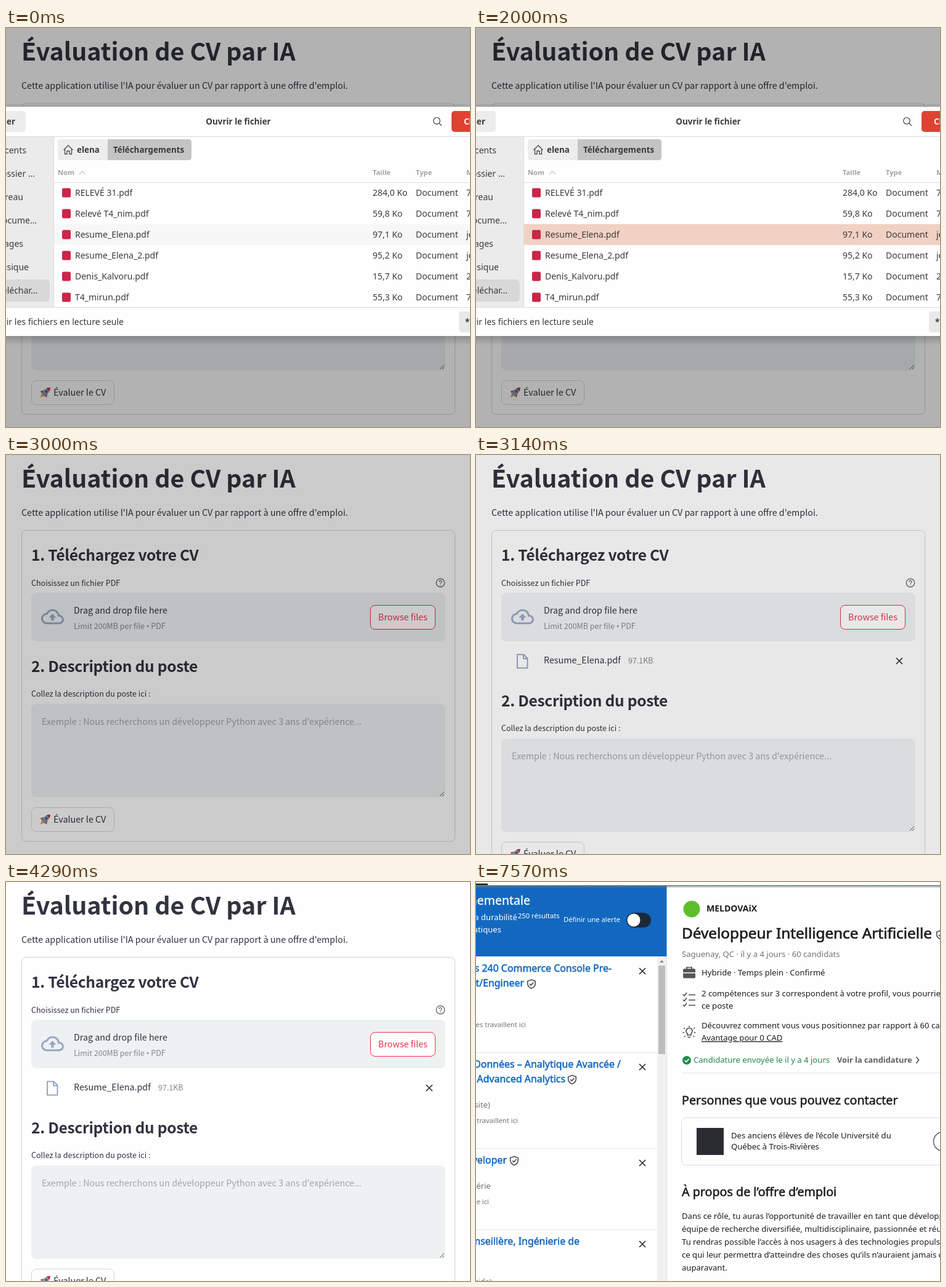
An HTML page for the animation above (8000 ms loop, 753x649 px).

```html
<!DOCTYPE html>
<html lang="fr">
<head>
<meta charset="utf-8">
<title>Évaluation de CV</title>
<style>
  html, body { margin: 0; width: 100%; height: 100%; overflow: hidden; background: #fefefe; }
  svg { display: block; }
  .scene, .anim { animation: 8s step-end infinite; }

  /* type */
  .app { font-family: "Noto Sans CJK JP", "Noto Sans CJK SC", "Noto Sans CJK", Lato, sans-serif; font-size: 14.3px; fill: #31333f; }
  .app .h1 { font-size: 39.4px; font-weight: 700; }
  .app .h2 { font-size: 24.6px; font-weight: 700; letter-spacing: -.3px; }
  .app .sm { font-size: 12.5px; }
  .app .mute { fill: #84858c; }
  .ui { font-family: "Noto Sans", "Open Sans", sans-serif; font-size: 14px; fill: #3b3b3b; }
  .ui .b { font-size: 13.4px; font-weight: 700; }
  .ui .col { font-size: 11.2px; font-weight: 700; fill: #a3a3a3; }
  .job { font-family: "Noto Sans", "Open Sans", sans-serif; font-size: 13.1px; fill: #1d1d1d; }
  /* a thin outline stands in for the medium weight */
  .job .title { font-size: 24.3px; stroke: #1d1d1d; stroke-width: .7; }
  .job .h { font-size: 19.7px; stroke: #1d1d1d; stroke-width: .55; }
  .job .link { font-size: 15.9px; fill: #0f66c0; stroke: #0f66c0; stroke-width: .5; }
  .job .tiny { font-size: 11.2px; }
  .job .grey { fill: #737373; }
  .job .white { fill: #fff; }
  .end { text-anchor: end; }

  /* lines */
  .line { fill: none; stroke: #dcdcdc; }
  .icon { fill: none; stroke: #4a4a4a; stroke-width: 1.6; }
  .thin { stroke-width: 1.3; }
  .cross { fill: none; stroke: #2b2d33; stroke-width: 1.7; }
  .frame { fill: none; stroke: #d3d4d8; }

  /* timeline */
  #page { animation-name: page; }
  #dialog { animation-name: dialog; }
  #offer { animation-name: offer; }
  #file { animation-name: file; }
  #lower { animation-name: lower; }
  #dim { animation-name: dim; fill: #000; }
  #row3 { animation-name: row3; }
  #row4 { animation-name: row4; }
  #choose { animation-name: choose; }
  #hover { animation-name: hover; }
  @keyframes page { 0% { visibility: visible } 78.625%, 100% { visibility: hidden } }
  @keyframes dialog { 0% { visibility: visible } 37.5%, 100% { visibility: hidden } }
  @keyframes offer { 0% { visibility: hidden } 78.625%, 100% { visibility: visible } }
  @keyframes file { 0% { opacity: 0 } 39.25%, 100% { opacity: 1 } }
  @keyframes lower { 0% { transform: translateY(-56px) } 39.25%, 100% { transform: none } }
  @keyframes dim { 0% { opacity: .3 } 37.5% { opacity: .2 } 39.25% { opacity: .088 } 41.125%, 100% { opacity: 0 } }
  @keyframes row3 {
    0% { fill: #f7f7f7 } 5.375% { fill: #fefefe } 8.875% { fill: #f4f4f4 } 19.625% { fill: #f1f1f1 }
    21.375% { fill: #f2e0d9 } 23.25%, 100% { fill: #f2d1c5 }
  }
  @keyframes row4 { 0% { fill: #fefefe } 5.375% { fill: #f5f5f5 } 8.875%, 100% { fill: #fefefe } }
  @keyframes choose { 0% { fill: #de4331 } 26.75% { fill: #de4b31 } 30.375%, 100% { fill: #df5431 } }
  @keyframes hover { 0% { opacity: 0 } 83.875% { opacity: 1 } 94.625%, 100% { opacity: 0 } }
</style>
</head>
<body>
<svg width="753" height="649" viewBox="0 0 753 649">
  <defs>
    <linearGradient id="shade" x2="0" y2="1">
      <stop offset="0" stop-color="#000" stop-opacity=".35"/>
      <stop offset="1" stop-color="#000" stop-opacity="0"/>
    </linearGradient>
    <linearGradient id="edge" x2="0" y2="1">
      <stop offset="0" stop-color="#6f7a7a"/>
      <stop offset="1" stop-color="#6f7a7a" stop-opacity="0"/>
    </linearGradient>
    <rect id="pdf" x="91" y="-7.5" width="14" height="15" rx="2.5" fill="#cb2547"/>
    <path id="x" d="M-5-5 5 5M5-5-5 5"/>
    <g id="shield" class="icon">
      <path d="M0-7 6.3-4.8V-1C6.3 3 3.6 5.6 0 7-3.6 5.6-6.3 3-6.3-1V-4.8Z"/>
      <path d="M-3-.2-.8 2 3.4-2.6"/>
    </g>
  </defs>

  <g id="page" class="scene app">
    <rect width="753" height="649" fill="#fefefe"/>
    <text class="h1" x="25" y="53">Évaluation de CV par IA</text>
    <text x="25" y="99">Cette application utilise l'IA pour évaluer un CV par rapport à une offre d'emploi.</text>
    <path class="frame" d="M25.5 480V130.5q0-8 8-8H720.5q8 0 8 8V480"/>
    <text class="h2" x="41" y="172">1. Téléchargez votre CV</text>
    <text class="sm" x="41" y="213">Choisissez un fichier PDF</text>
    <circle cx="705" cy="208" r="6.7" fill="none" stroke="#6c6d75" stroke-width="1.4"/>
    <path d="M703 206.6q0-2.2 2-2.2t2 1.9q0 1.2-1.2 1.9-.8.5-.8 1.6M705 211v1.3" fill="none" stroke="#6c6d75" stroke-width="1.3"/>
    <rect x="41" y="224" width="672" height="79" rx="8" fill="#eef1f2"/>
    <g transform="translate(57 244.5) scale(1.54)" fill="#98a6c3">
      <path d="M19.35 10.04A7.49 7.49 0 0 0 12 4C9.11 4 6.6 5.64 5.35 8.04A5.994 5.994 0 0 0 0 14c0 3.31 2.69 6 6 6h13c2.76 0 5-2.24 5-5 0-2.64-2.05-4.78-4.65-4.96zM19 18H6c-2.21 0-4-1.79-4-4 0-2.05 1.53-3.76 3.56-3.97l1.07-.11.5-.95A5.469 5.469 0 0 1 12 6c2.62 0 4.88 1.86 5.39 4.43l.3 1.5 1.53.11A2.98 2.98 0 0 1 22 15c0 1.65-1.35 3-3 3z"/>
      <path d="M8 13h2.55v3h2.9v-3H16l-4-4z"/>
    </g>
    <text x="110" y="258">Drag and drop file here</text>
    <text class="sm mute" x="110" y="283">Limit 200MB per file <tspan font-family="Noto Sans, sans-serif">•</tspan> PDF</text>
    <rect x="591.5" y="244.5" width="105" height="39" rx="7.5" fill="#fefefe" stroke="#e6344b"/>
    <text x="644" y="269" text-anchor="middle" fill="#e6344b">Browse files</text>

    <g id="file" class="anim">
      <path d="M67 324.5h10.5l6 6.2V346.5H67ZM77 324.5v6.7h6.5" fill="none" stroke="#98a6c3" stroke-width="2" stroke-linejoin="round"/>
      <text x="110" y="339">Resume_Elena.pdf</text>
      <text class="sm mute" x="247" y="339">97.1KB</text>
      <use href="#x" class="cross" x="687" y="335"/>
    </g>

    <g id="lower" class="anim">
      <path class="frame" d="M25.5 470V676.5q0 8 8 8H720.5q8 0 8-8V470"/>
      <text class="h2" x="41" y="409">2. Description du poste</text>
      <text class="sm" x="41" y="449">Collez la description du poste ici :</text>
      <rect x="41" y="461" width="672" height="152" rx="8" fill="#eef1f2"/>
      <text x="58" y="495" fill="#a3a4a9">Exemple : Nous recherchons un développeur Python avec 3 ans d'expérience...</text>
      <path d="M704 611l7-7M708 611l3-3" fill="none" stroke="#55565c"/>
      <rect x="41.5" y="629.5" width="134" height="39" rx="7.5" fill="#fefefe" stroke="#d3d4d8"/>
      <g transform="translate(64 648.5) rotate(45)">
        <path d="M-4-1-7 4.5-4 5ZM4-1 7 4.5 4 5Z" fill="#c5303c"/>
        <path d="M-2.5 6h5L0 12Z" fill="#f59a23"/>
        <path d="M0-11Q5-6 4 6H-4Q-5-6 0-11Z" fill="#8697a5"/>
        <path d="M0-11q2.5 2.5 3.4 5h-6.8q.9-2.5 3.4-5Z" fill="#c5303c"/>
        <circle cy="-2" r="1.9" fill="#3c6288"/>
      </g>
      <text x="77" y="654">Évaluer le CV</text>
    </g>
    <rect id="dim" class="anim" width="753" height="649"/>
  </g>

  <g id="dialog" class="scene ui">
    <rect y="500" width="753" height="16" fill="url(#shade)" opacity=".6"/>
    <rect y="124" width="753" height="5" fill="#000" opacity=".07"/>
    <rect y="128" width="753" height="373" fill="#fefefe"/>
    <path class="line" d="M0 128.5H753" stroke-opacity=".6"/>
    <rect x="-20" y="135" width="52" height="34" rx="5" fill="#ececec"/>
    <text class="b end" x="15" y="157">Annuler</text>
    <text class="b" x="377" y="157" text-anchor="middle">Ouvrir le fichier</text>
    <g class="icon thin">
      <circle cx="699" cy="151" r="5.3"/>
      <path d="M703 155l4 4"/>
    </g>
    <rect id="choose" class="anim" x="723" y="135" width="60" height="34" rx="5"/>
    <text class="b" x="743" y="157" fill="#fff">Choisir</text>

    <rect y="176" width="77" height="279" fill="#ebebeb"/>
    <rect x="-10" y="409" width="81" height="36" rx="6" fill="#d8d8d8"/>
    <path class="line" d="M0 176.5H753M77.5 176V454M78 251.5H753"/>
    <g class="end">
      <text x="33" y="204">Récents</text>
      <text x="47" y="242">Dossier …</text>
      <text x="28" y="280">Bureau</text>
      <text x="50" y="318">Docume…</text>
      <text x="28" y="356">Images</text>
      <text x="37" y="394">Musique</text>
      <text x="51" y="432">Téléchar…</text>
      <text x="191" y="483">Ouvrir les fichiers en lecture seule</text>
    </g>

    <path d="M165 181H89q-5 0-5 5V210q0 5 5 5H165Z" fill="#ededed"/>
    <path d="M165 181H296q5 0 5 5V210q0 5-5 5H165Z" fill="#c4c4c4"/>
    <path class="icon thin" d="M93.5 198.5 101 191l7.5 7.5M95.5 197V205H99V200h4V205h3.5V197"/>
    <text class="b" x="115" y="203">elena</text>
    <text class="b" x="174" y="203">Téléchargements</text>
    <text class="col" y="239"><tspan x="84">Nom</tspan><tspan x="595">Taille</tspan><tspan x="665">Type</tspan><tspan x="747">Modifié</tspan></text>
    <path d="M119 238l5-5 5 5" fill="none" stroke="#a3a3a3"/>

    <rect id="row3" class="anim" x="78" y="319" width="675" height="34"/>
    <rect id="row4" class="anim" x="78" y="353" width="675" height="34"/>
    <use href="#pdf" y="268"/><use href="#pdf" y="302"/><use href="#pdf" y="336"/>
    <use href="#pdf" y="370"/><use href="#pdf" y="404"/><use href="#pdf" y="438"/>
    <text x="112" y="273">RELEVÉ 31.pdf<tspan x="595">284,0 Ko</tspan><tspan x="665">Document</tspan><tspan x="747">7 mai</tspan></text>
    <text x="112" y="307">Relevé T4_nim.pdf<tspan x="595">59,8 Ko</tspan><tspan x="665">Document</tspan><tspan x="747">7 mai</tspan></text>
    <text x="112" y="341">Resume_Elena.pdf<tspan x="595">97,1 Ko</tspan><tspan x="665">Document</tspan><tspan x="747">jeu.</tspan></text>
    <text x="112" y="375">Resume_Elena_2.pdf<tspan x="595">95,2 Ko</tspan><tspan x="665">Document</tspan><tspan x="747">jeu.</tspan></text>
    <text x="112" y="409">Denis_Kalvoru.pdf<tspan x="595">15,7 Ko</tspan><tspan x="665">Document</tspan><tspan x="747">2 mai</tspan></text>
    <text x="112" y="443">T4_mirun.pdf<tspan x="595">55,3 Ko</tspan><tspan x="665">Document</tspan><tspan x="747">7 mai</tspan></text>

    <path class="line" d="M0 454.5H753"/>
    <rect x="735" y="461" width="60" height="34" rx="5" fill="#e9e9e9"/>
    <text class="b" x="745" y="483">*.pdf</text>
  </g>

  <g id="offer" class="scene job">
    <rect width="753" height="649" fill="#fefefe"/>
    <rect y="6" width="309.5" height="115" fill="#1268be"/>
    <rect y="5" width="753" height="5" fill="url(#edge)"/>
    <rect y="2.5" width="19" height="2.5" fill="#1c1f1c"/>
    <g class="white">
      <text class="end" x="88" y="37" font-size="19.5" stroke="#fff" stroke-width=".3">environnementale</text>
      <text class="end" x="67" y="62">la durabilité</text>
      <text class="end" x="41" y="82">pratiques</text>
      <text class="tiny" x="68" y="59">250 résultats</text>
      <text class="tiny" x="142" y="65">Définir une alerte</text>
    </g>
    <rect x="244" y="50" width="40" height="24" rx="12" fill="#1b2a39"/>
    <circle cx="256" cy="62" r="10.5" fill="#fff"/>

    <rect x="294" y="121" width="15.5" height="528" fill="#f1f1f1"/>
    <rect x="296" y="136" width="11" height="144" fill="#bdbdbd"/>
    <path d="M298 131l3.5-4 3.5 4Z" fill="#8a8a8a"/>
    <path class="line" d="M0 277.5H294M0 433.5H294M0 565.5H294M334 310.5H753M309.5 121V649" stroke-opacity=".8"/>
    <g class="cross">
      <use href="#x" x="270" y="145"/><use href="#x" x="270" y="301"/>
      <use href="#x" x="270" y="457"/><use href="#x" x="270" y="589"/>
    </g>
    <use href="#shield" x="90" y="166"/><use href="#shield" x="156" y="321.5"/>
    <use href="#shield" x="62" y="453.5"/><use href="#shield" x="754" y="86"/>

    <g class="end link">
      <text x="220" y="146">Tavorics 240 Commerce Console Pre-</text>
      <text x="78" y="170">Consultant/Engineer</text>
      <text x="235" y="302">Données – Analytique Avancée /</text>
      <text x="145" y="326">Advanced Analytics</text>
      <text x="50" y="458">Developer</text>
      <text x="168" y="590">Conseillère, Ingénierie de</text>
    </g>
    <path id="hover" class="anim" d="M0 148.5H220M0 171.5H78" stroke="#0f66c0" stroke-width="1.2"/>
    <g class="end grey">
      <text class="tiny" x="81" y="236">Des personnes travaillent ici</text>
      <text x="23" y="367">(Sur site)</text>
      <text class="tiny" x="68" y="392">travaillent ici</text>
      <text x="24" y="499">Algérie</text>
      <text class="tiny" x="21" y="524">travaille ici</text>
      <text x="26" y="655">(Hybride)</text>
    </g>

    <circle cx="350" cy="44" r="13.5" fill="#5cbf2a"/>
    <text x="374" y="48" font-size="14" font-weight="600">MELDOVAiX</text>
    <text class="title" x="334" y="92">Développeur Intelligence Artificielle</text>
    <text class="grey" x="334" y="122">Saguenay, QC · il y a 4 jours · 60 candidats</text>

    <path d="M336 143q0-2 2-2h3v-3h10v3h3q2 0 2 2v4h-20ZM343 141h6v-1.5h-6ZM336 148.5h20v6q0 2-2 2h-16q-2 0-2-2Z" fill="#565656" fill-rule="evenodd"/>
    <text x="366" y="152">Hybride · Temps plein · Confirmé</text>
    <path class="icon" d="M336 183l2 2 4-5M336 191.5l2 2 4-5M336 200l2 2 4-5M345 183.5h11M345 192h11M345 200.5h11"/>
    <text x="366" y="186">2 compétences sur 3 correspondent à votre profil, vous pourriez</text>
    <text x="366" y="206">ce poste</text>
    <path class="icon" d="M343 249v-2.5a5 5 0 1 1 6 0V249ZM343.5 252.5h5M346 234v2M337 237l2 1.6M355 237l-2 1.6M335.5 245h2.5M354 245h2.5M338 252l1.6-1.5M354 252l-1.6-1.5"/>
    <text x="366" y="238">Découvrez comment vous vous positionnez par rapport à 60 candidats</text>
    <text x="366" y="258" text-decoration="underline">Avantage pour 0 CAD</text>
    <circle cx="342" cy="290" r="7" fill="#1f8a4c"/>
    <path d="M338.7 290.2l2.5 2.5 4.3-5" fill="none" stroke="#fff" stroke-width="1.7"/>
    <text x="353" y="294" fill="#1f8a4c">Candidature envoyée le il y a 4 jours</text>
    <text x="586" y="294" fill="#5f5f5f" font-size="12.8" font-weight="600">Voir la candidature</text>
    <path class="icon" d="M714.5 284.5l4 5-4 5.5"/>

    <text class="h" x="334" y="362">Personnes que vous pouvez contacter</text>
    <rect class="line" x="333.5" y="383.5" width="440" height="77" rx="8"/>
    <rect x="358" y="400" width="44" height="44" fill="#2a2c31"/>
    <text x="414" y="417">Des anciens élèves de l’école Université du</text>
    <text x="414" y="435">Québec à Trois-Rivières</text>
    <rect class="icon thin" x="742.5" y="406.5" width="90" height="31" rx="15.5"/>

    <text class="h" x="334" y="511">À propos de l’offre d’emploi</text>
    <text x="334" y="548">Dans ce rôle, tu auras l’opportunité de travailler en tant que développeur</text>
    <text x="334" y="569">équipe de recherche diversifiée, multidisciplinaire, passionnée et réunie</text>
    <text x="334" y="590">Tu rendras possible l’accès à nos usagers à des technologies propulsées</text>
    <text x="334" y="611">ce qui leur permettra d’atteindre des choses qu’ils n’auraient jamais cru</text>
    <text x="334" y="632">auparavant.</text>
  </g>
</svg>
</body>
</html>
```
